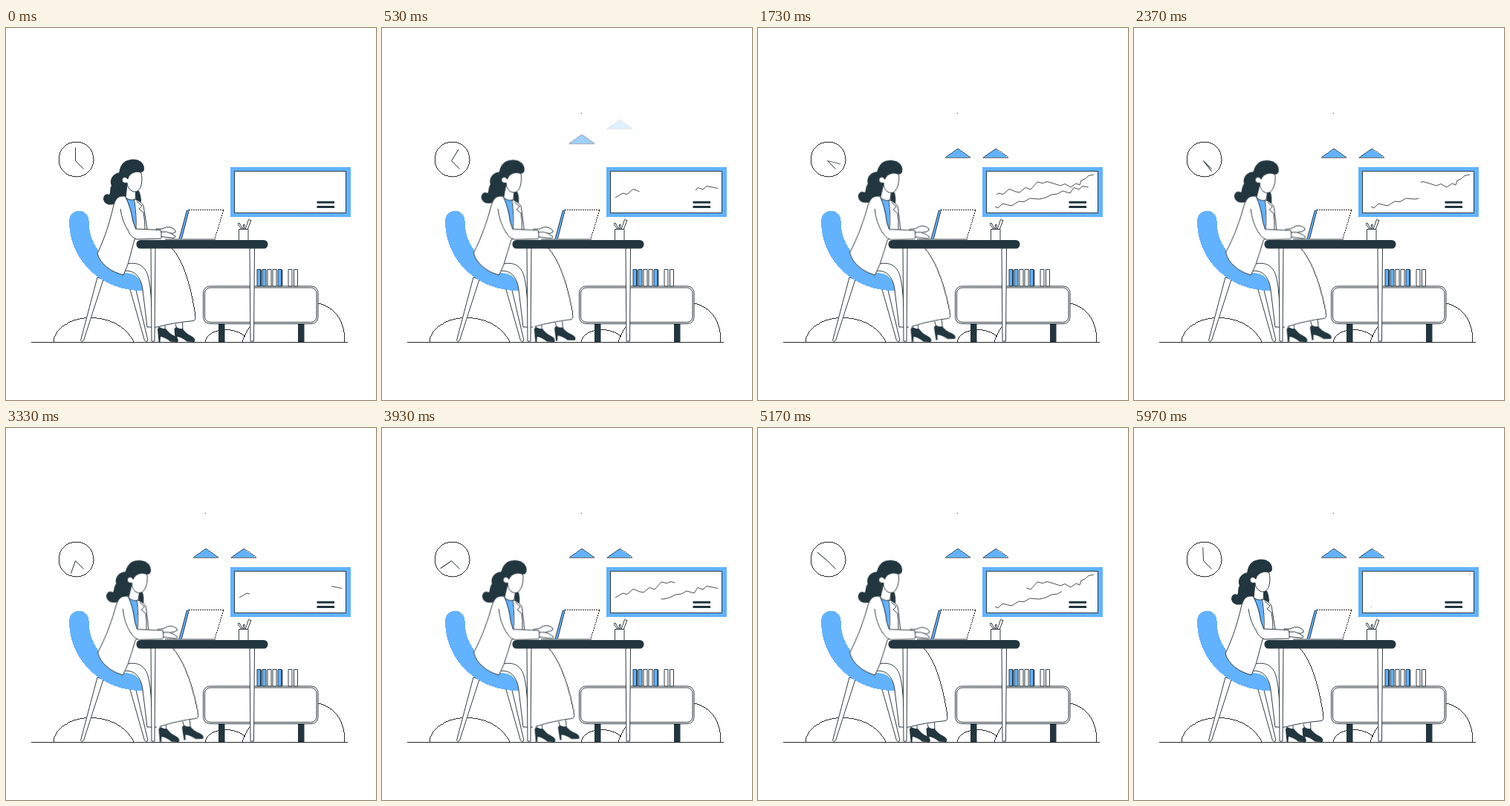
Recreate the animation shown at these times as an HTML page. Size 498x500 px, loop 6010 ms.

```html
<!DOCTYPE html>
<html lang="en">
<head>
<meta charset="utf-8">
<title>Woman working at a desk</title>
<style>
  html, body { margin: 0; width: 100%; height: 100%; overflow: hidden; background: #fff; }
  svg { display: block; width: 100vw; height: 100vh; }

  .line { fill: none; stroke: #263238; stroke-width: .95; stroke-linejoin: round; }
  .white { fill: #fff; }
  .thin { fill: none; stroke: #111; stroke-width: .9; }
  .crisp { shape-rendering: crispEdges; }
  .dark { fill: #22363f; }
  .blue { fill: #62b2ff; }

  .loop { animation: 6.01s linear infinite; }
  .minute { animation-name: turn; transform-origin: 93.5px 178.5px; }
  .lamp { animation-timing-function: cubic-bezier(.36, -.01, .5, 1.38); }
  .first { animation-name: drop-first; }
  .second { animation-name: drop-second; }
  .speck { animation-name: appear; animation-timing-function: step-end; }
  .eased { animation-timing-function: ease-in-out; }
  .torso { animation-name: lean; transform-origin: 155px 315px; }
  .head { animation-name: nod; transform-origin: 168px 228px; }
  .arm { animation-name: level; transform-origin: 166px 276px; }
  .hand { animation-name: tap; transform-origin: 203px 277px; }
  .skirt { animation-name: swing; transform-origin: 185px 310px; }
  .shoe-a { animation-name: nudge; }
  .shoe-b { animation-name: step; transform-origin: 229px 421px; }
  .trend {
    stroke: #444; stroke-dasharray: 1 2;
    animation: trace 3.005s cubic-bezier(.365, 0, .8, 1) infinite;
  }

  @keyframes turn { to { transform: rotate(360deg); } }
  @keyframes drop-first {
    0%, 1.6% { transform: translateY(-48px); opacity: 0; }
    18.3%, 100% { transform: none; opacity: 1; }
  }
  @keyframes drop-second {
    0%, 5% { transform: translateY(-48px); opacity: 0; }
    21.6%, 100% { transform: none; opacity: 1; }
  }
  @keyframes appear { 0% { opacity: 0; } 1.7%, 100% { opacity: 1; } }
  @keyframes lean {
    0%, 99.3%, 100% { transform: rotate(0deg); }
    14%, 86% { transform: rotate(2.4deg); }
    50% { transform: rotate(2.6deg); }
  }
  @keyframes nod {
    0%, 99.3%, 100% { transform: rotate(0deg); }
    14%, 86% { transform: rotate(4.2deg); }
    50% { transform: rotate(5deg); }
  }
  @keyframes level {
    0%, 99.3%, 100% { transform: rotate(0deg); }
    14%, 86% { transform: translateX(1px) rotate(-2.4deg); }
    50% { transform: translateX(1px) rotate(-2.6deg); }
  }
  @keyframes tap {
    0%, 86%, 100% { transform: rotate(0deg); }
    17% { transform: rotate(-2deg); }
    35% { transform: rotate(-9deg); }
    55% { transform: rotate(-7deg); }
    74% { transform: rotate(-11deg); }
  }
  @keyframes swing {
    0%, 84.4%, 100% { transform: rotate(0deg); }
    17%, 64.5% { transform: rotate(-2.8deg); }
  }
  @keyframes nudge {
    0%, 84.4%, 100% { transform: none; }
    17%, 64.5% { transform: translateX(1.5px); }
  }
  @keyframes step {
    0%, 84.4%, 100% { transform: translate(0, 0) rotate(0deg); }
    17%, 64.5% { transform: translate(11.5px, -2.5px) rotate(-4deg); }
  }
  @keyframes trace {
    0% { stroke-dashoffset: 1; }
    50% { stroke-dashoffset: 0; }
    100% { stroke-dashoffset: -1; }
  }
</style>
</head>
<body>
<svg viewBox="0 0 498 500">
  <defs>
    <path id="lamp" d="M-17 12L0 0L17 12Z"/>
    <path id="shoe" d="M204 405Q205 401 209 403Q212 405 215 404Q220 411 227 414Q234 418 231 422L221 421.5Q213 415 208 415L207.500 422H205.500Z"/>
    <rect id="book" y="324.500" width="5" height="22.500"/>
  </defs>

  <!-- mounds and floor -->
  <g class="thin crisp">
    <path d="M64 422C65 403 88 389.500 113 389.500C141 389.500 162 402 172 422"/>
    <path d="M268 422C272 402 309 401 322 415"/>
    <path d="M318 422C325 398 350 369 404 369C437 367 456 388 456 422"/>
    <path d="M34 422.500H460"/>
  </g>

  <!-- clock -->
  <circle class="thin crisp" cx="94.500" cy="176.500" r="23.500"/>
  <path class="line" d="M93.500 178.500L104.500 189.500"/>
  <path class="line loop minute" d="M93.500 178.500V160.500"/>

  <!-- lamps -->
  <rect class="loop speck" x="268" y="114" width="1" height="1"/>
  <g class="blue crisp" stroke="#111" stroke-width=".6">
    <g class="loop lamp first"><use href="#lamp" x="269" y="162"/></g>
    <g class="loop lamp second"><use href="#lamp" x="319.500" y="162"/></g>
  </g>

  <!-- board -->
  <rect class="blue" x="302" y="187" width="162" height="67"/>
  <rect class="line white" x="307.500" y="192.500" width="150" height="56"/>
  <path class="line trend" pathLength="1" d="M314 228L324 222L330 223.500L338 216.500L347 220L352 221L360 214.500L367 217L376 207L383 208.500L389 206.500L398 209L407 212L413 209.500L421 214L428 209L433 211L435 205L440 203L445 198.500L452 197"/>
  <path class="line trend" pathLength="1" d="M452 215.500L437 212.500L432 217L425 214.500L420 222L410 219L403 223L395 224L387 228L379 230L366 229L358 233.500L351 233L341 239L329 236L323 242L319 240"/>
  <path class="dark" d="M418.500 232.700h23.500v3.100h-23.500zM418.500 239h23.500v3.100h-23.500z"/>

  <!-- cabinet and books -->
  <path class="dark" d="M286 397h8.500v25h-8.500zM393 397h8.500v25h-8.500z"/>
  <rect class="line white" x="265.500" y="347" width="154.500" height="50.500" rx="9"/>
  <rect class="line" x="267.500" y="349" width="150.500" height="46.500" rx="7.500"/>
  <g class="line">
    <use href="#book" class="blue" x="338"/>
    <use href="#book" class="blue" x="345"/>
    <use href="#book" class="white" x="352"/>
    <use href="#book" class="white" x="359"/>
    <use href="#book" class="blue" x="366"/>
    <use href="#book" class="white" x="380"/>
    <use href="#book" class="white" x="387.500"/>
    <path d="M343 325V347M371.500 325V347" stroke-width="1.6"/>
  </g>

  <!-- chair -->
  <path class="line white" d="M123 335L100.500 420Q102 423 104.500 420L131 338ZM166 348L186.500 420Q189 423 191 420L174 348Z"/>
  <path class="crisp" fill="none" stroke="#62b2ff" stroke-width="26.500" d="M98.300 259C98 304 134 341 188 340"/>
  <circle class="blue crisp" cx="98.300" cy="259" r="13.250"/>

  <!-- legs -->
  <g class="loop eased shoe-a">
    <path class="line white" d="M206 396V405L214 406V396"/>
    <use href="#shoe" class="dark"/>
  </g>
  <g class="loop eased shoe-b">
    <path class="line white" d="M226 390L230 405L238 405L237 388"/>
    <use href="#shoe" class="dark" x="22.500"/>
  </g>
  <g class="loop eased skirt">
    <path class="white" d="M185 296H223C239 312 250 351 255 388L253 393.500L203 402L190 400Z"/>
    <path class="thin crisp" d="M223 296C239 312 250 351 255 388"/>
    <path class="line" d="M255 388Q255 393 253 393.500Q225 396 203 402"/>
  </g>
  <path class="white" d="M160 320C170 313 183 315 190 326L197 350V402H190L184 352C182 338 176 329 158 329Z"/>
  <path class="line" d="M163 317C178 314 187 320 191 333Q195 347 196 375M158 327C174 324 182 336 184 352L190 402H203"/>

  <!-- torso -->
  <g class="loop eased torso">
    <g class="loop eased head">
      <path class="dark" d="M157 194C146 193 138 202 142 212C139 216 141 222 139 224C135 222 131 225 131 230C132 236 138 239 144 237C150 237 155 233 157 227L166 226L170 214Z"/>
      <path class="dark" d="M173 217L179 219Q182 225 182 234L175 231Z"/>
    </g>
    <path class="line white" d="M159 226C150 225 147 231 145 238C140 259 134 280 123 303C127 318 142 328 158 332Q165 318 168 303L173 284L190 270L185 239Q183 234 173 230Z"/>
    <path class="blue" d="M161 229L172 230Q175 250 174.500 271L170 258Q167 240 161 229Z"/>
    <path class="line" d="M161 227Q168 241 171 260L175 271M172.500 230Q176 252 175 271M176 233L183 239L179 243L185 248Q187 258 187 270"/>
    <path class="line" d="M154 243Q156 260 166 275"/>
    <g class="loop eased head">
      <path class="line white" d="M163 210L161 228Q168 233 174 230L175 217"/>
      <path class="dark" d="M153 203C150 190 156 178 167 177C177 175 186 180 186 189Q186 194 181 194L176 205L162 212Z"/>
      <path class="line white" d="M165 200C168 194 178 191 182 195C184 204 183 218 175 220C168 221 163 214 163 208C157 210 154 204 158 201Q161 199 164 203Z"/>
    </g>
    <g class="loop eased arm">
      <g class="loop eased hand">
        <path class="line white" d="M202 270L210 270Q217 266 222 268Q228 270 228.500 274Q225 277 220 276L208 280Z"/>
      </g>
      <path class="white" d="M173 270L208 271.500L210 283H175L165 274Z"/>
      <path class="line" d="M174 270L208 271.500Q211 277 209 282M165 274Q169 282 176 284L209 283"/>
      <path class="line white" d="M209 274Q217 273 222 276L228 280Q228 283 223 282L209 280.500Z"/>
    </g>
  </g>

  <!-- laptop and pens -->
  <path class="white" d="M246 244.500H293L281 283.500H237Z"/>
  <path class="thin crisp" d="M246 244.500H293L281 283.500" stroke-dasharray="2 1"/>
  <path class="blue" d="M243.500 244H246.500L236.500 283.500H233Z"/>
  <path class="line" d="M246.500 244L236.500 283M243.500 245L233 283.500M214 284H281.500"/>
  <path class="line white" d="M317 271L312 263L314 262L319 271ZM319 271L319.500 264H321L321 271ZM322 271L326.500 257.500L330 258.500L325 271Z"/>
  <rect class="line white" x="313.500" y="270.500" width="12.500" height="15"/>

  <!-- table -->
  <path class="line white" d="M195 294h6l-1 127h-4zM328 294h6.500l-1 127h-4.500z"/>
  <rect class="dark" x="175.500" y="285" width="177" height="11.500" rx="5.500"/>
</svg>
</body>
</html>
```
